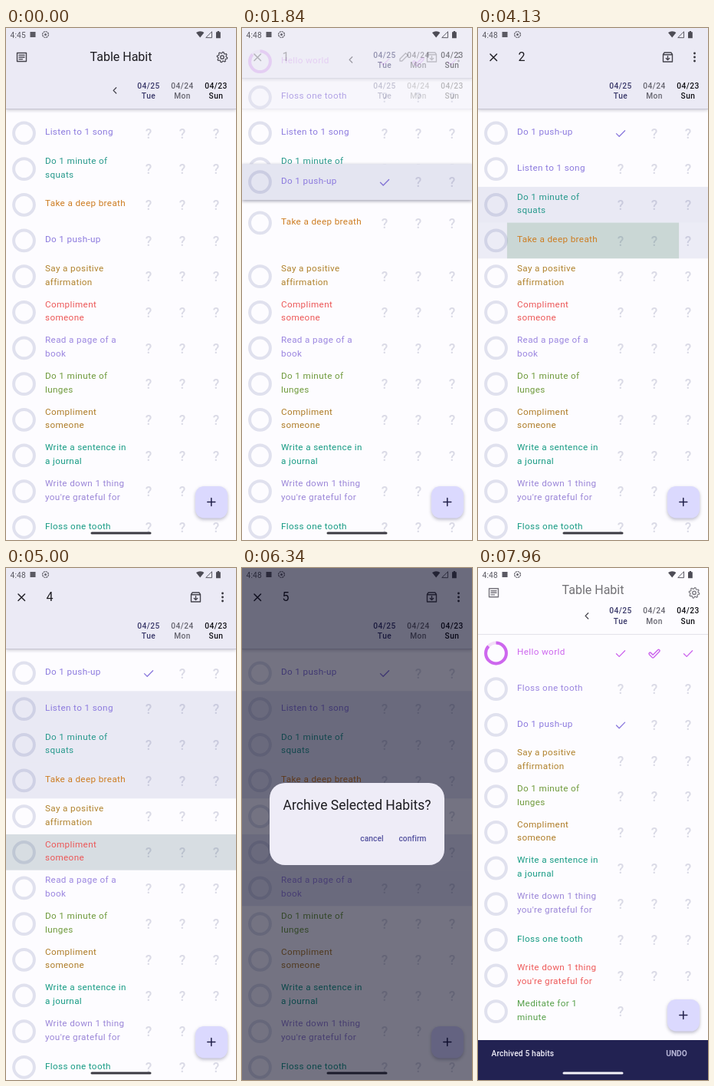
An HTML page that plays this animation: 300x667 px, repeating every 8000 ms.

```html
<!DOCTYPE html>
<html lang="en">
<head>
<meta charset="utf-8">
<title>Habit list</title>
<style>
  html, body { margin: 0; width: 100%; height: 100%; overflow: hidden; background: #fdfcff; }
  svg { display: block; width: 100%; height: 100%; font-family: Roboto, sans-serif; }
  .line { fill: none; stroke-linecap: round; stroke-linejoin: round; }
  .habit { font-size: 11.7px; letter-spacing: .365px; }
  .mark { font-size: 17.5px; font-weight: 500; fill: #dadae6; text-anchor: middle; }
  .date { font-size: 10.2px; font-weight: 500; letter-spacing: .45px; text-anchor: middle; }
  .title { font-size: 16px; fill: #1c1b20; }
</style>
</head>
<body>
<svg id="stage" viewBox="0 0 300 667"></svg>
<script>
const LOOP = 8000, ROW = 46.67, TOP = 43.6, COLS = [186, 230, 274];
const OPEN = 106, SHUT = 66, INK = '#45444d', TINT = '#ebeaf5', PAPER = '#fdfcff', VEIL = '#3f4791';
const stage = document.getElementById('stage');

const clamp = (v, a = 0, b = 1) => Math.min(b, Math.max(a, v));
const ramp = (t, a, b) => clamp((t - a) / (b - a));
const ease = (t, a, b) => (1 - Math.cos(Math.PI * ramp(t, a, b))) / 2;
const pulse = (t, a, b, c, d) => ramp(t, a, b) - ramp(t, c, d);

function set(el, attrs) {
  for (const k in attrs) el.setAttribute(k, attrs[k]);
  return el;
}
function add(parent, tag, attrs = {}, text) {
  const el = set(document.createElementNS('http://www.w3.org/2000/svg', tag), attrs);
  if (text !== undefined) el.textContent = text;
  parent.appendChild(el);
  return el;
}
const group = (parent = stage) => add(parent, 'g');
const move = (el, x, y) => el.setAttribute('transform', `translate(${x} ${y})`);
const fade = (el, o) => {
  el.setAttribute('opacity', o.toFixed(3));
  el.style.display = o <= 0 ? 'none' : '';
};
const stroke = (parent, d, color = INK, width = 1.4) =>
  add(parent, 'path', { d, class: 'line', stroke: color, 'stroke-width': width });
const tick = (parent, x, color, width = 1.35) =>
  stroke(parent, `M${x - 5.5} .7l3.7 3.7l7.4 -7.6`, color, width);

// text, colour, time selected (selected rows are archived later)
const HABITS = [
  ['Hello world', '#cd67ee'],
  ['Floss one tooth', '#9b86e0'],
  ['Listen to 1 song', '#8c7ade', 4450],
  ['Do 1 minute of|squats', '#27998c', 3300],
  ['Take a deep breath', '#cd7d22', 4080],
  ['Do 1 push-up', '#8c7ade'],
  ['Say a positive|affirmation', '#b0822c'],
  ['Compliment|someone', '#ec5757', 4800],
  ['Read a page of a|book', '#9b86e0', 5150],
  ['Do 1 minute of|lunges', '#6f9a3c'],
  ['Compliment|someone', '#ae7c27'],
  ['Write a sentence in|a journal', '#179b84'],
  ['Write down 1 thing|you\'re grateful for', '#9b86d8'],
  ['Floss one tooth', '#179b84'],
  ['Write down 1 thing|you\'re grateful for', '#ee5a5a'],
  ['Meditate for 1|minute', '#57a04a']
];
const HELLO = 0, PUSH = 5, LAST = 15, GRAB = 900;

const defs = add(stage, 'defs');
const blur = add(defs, 'filter', { id: 'soft', x: '-30%', y: '-30%', width: '160%', height: '170%' });
add(blur, 'feGaussianBlur', { stdDeviation: 2 });
add(stage, 'rect', { width: 300, height: 667, fill: PAPER });
const list = group();

function makeRow([label, color, at], i) {
  const g = group(list), row = { g, at, i };
  const band = attrs => add(g, 'rect', { width: 300, y: -ROW / 2, height: ROW, ...attrs });
  if (i === PUSH) {
    row.shadow = band({ fill: '#77778a', filter: 'url(#soft)', y: -ROW / 2 + 1.5 });
    row.sheet = band({ fill: PAPER });
  }
  add(g, 'circle', { cx: 23.5, r: 13.4, fill: 'none', stroke: i === HELLO ? '#f3def8' : '#e0e1ee', 'stroke-width': 4 });
  if (i === HELLO) {
    add(g, 'circle', { cx: 23.5, r: 13.4, fill: 'none', stroke: color, 'stroke-width': 4,
      pathLength: 100, 'stroke-dasharray': '87 13', transform: 'rotate(-90 23.5 0)' });
    tick(g, COLS[0], color);
    tick(g, COLS[1], color, 4.4);
    tick(g, COLS[1], PAPER, 1.5);
    tick(g, COLS[2], color);
  } else {
    row.marks = COLS.slice(0, i === LAST ? 1 : 3).map(x => add(g, 'text', { x, y: 6.8, class: 'mark' }, '?'));
  }
  if (i === PUSH) row.tick = tick(g, COLS[0], color);
  if (at || i === PUSH) row.veil = band({ fill: VEIL });
  if (at) row.ripple = band({ fill: '#0d5d1e' });
  const lines = label.split('|');
  lines.forEach((s, n) => add(g, 'text', {
    x: 51, y: 2.2 + (n - (lines.length - 1) / 2) * 17.5, class: 'habit', fill: color }, s));
  return row;
}
const rows = HABITS.map(makeRow);
list.appendChild(rows[PUSH].g);

function makeHeader() {
  const g = group();
  const shade = add(g, 'rect', { width: 300, fill: '#8b8b9c', opacity: .5, filter: 'url(#soft)' });
  const back = add(g, 'rect', { width: 300, fill: TINT });
  const edge = add(g, 'rect', { width: 300, height: 1, fill: '#c9c8d5' });
  const dates = group(g);
  [['04/25', 'Tue', '#3b3a6b'], ['04/24', 'Mon', '#66656f'], ['04/23', 'Sun', '#111116']].forEach(([d, w, fill], n) => {
    add(dates, 'text', { x: COLS[n], y: -27.5, class: 'date', fill }, d);
    add(dates, 'text', { x: COLS[n], y: -14, class: 'date', fill }, w);
  });
  return { g, dates, size(h) {
    set(shade, { height: h + 1 });
    set(back, { height: h });
    set(edge, { y: h - 1 });
    move(dates, 0, h);
  }, back, shade, edge };
}

// Normal header
const base = makeHeader();
stroke(base.dates, 'M143.7 -28.2l-3.6 3.6l3.6 3.6', INK, 1.3);
const title = add(base.g, 'text', { x: 150, class: 'title', 'text-anchor': 'middle' }, 'Table Habit');
const icons = group(base.g);
stroke(icons, 'M14.5 -5.5h12v11h-12zM17 -2.6h7M17 0h7M17 2.6h4.5');
add(icons, 'circle', { cx: 282, r: 2.2, fill: 'none', stroke: INK, 'stroke-width': 1.3 });
const gear = Array.from({ length: 32 }, (_, k) => {
  const a = (k + .5) * Math.PI / 16, r = k % 4 < 2 ? 6.8 : 5.2;
  return `${(282 + r * Math.cos(a)).toFixed(2)} ${(r * Math.sin(a)).toFixed(2)}`;
});
stroke(icons, `M${gear.join('L')}Z`, INK, 1.2);

// Selection header
const pick = makeHeader();
pick.size(OPEN);
stroke(pick.g, 'M16 34l8.5 8.5M24.5 34l-8.5 8.5', '#222128', 1.5);
const count = add(pick.g, 'text', { x: 52.5, y: 43, class: 'title' });
const pencil = stroke(pick.g, 'M206 43v-2.7l7.5 -7.5l2.7 2.7l-7.5 7.5z');
stroke(pick.g, 'M241.5 34.5l1.7 -2.5h8.6l1.7 2.5v9.5h-12zM241.5 34.8h12M247.5 36.8v4.6M245.3 39.4l2.2 2.2l2.2 -2.2');
[33, 38, 43].forEach(cy => add(pick.g, 'circle', { cx: 282.5, cy, r: 1.4, fill: '#33323a' }));

// Floating button
const fab = group();
const button = attrs => add(fab, 'rect', { x: 247, width: 42, height: 41.5, rx: 11.5, ...attrs });
button({ y: 599, fill: '#6a6a88', opacity: .45, filter: 'url(#soft)' });
button({ y: 597, fill: '#dbd9fe' });
stroke(fab, 'M262.8 617.5h10M267.8 612.5v10', '#22214a', 1.5);

// Snack bar
const snack = group();
add(snack, 'rect', { y: 615, width: 300, height: 53, fill: '#222252' });
add(snack, 'text', { x: 17.5, y: 635.5, 'font-size': 10.2, 'font-weight': 500, fill: '#f1effa', 'letter-spacing': .15 }, 'Archived 5 habits');
add(snack, 'text', { x: 259, y: 635.7, 'font-size': 10.2, 'font-weight': 700, fill: '#b6b5d6', 'text-anchor': 'middle' }, 'UNDO');

// System bars
const clock = add(stage, 'text', { x: 5.5, y: 12.5, 'font-size': 10.2, fill: '#5a5962', 'letter-spacing': .2 });
add(stage, 'rect', { x: 31.5, y: 5, width: 7, height: 7, fill: '#5b5a63' });
add(stage, 'circle', { cx: 51.5, cy: 8.5, r: 3.9, fill: 'none', stroke: '#66656e', 'stroke-width': 1.4, 'stroke-dasharray': '2.2 .8' });
add(stage, 'circle', { cx: 51.5, cy: 8.5, r: 1.5, fill: '#66656e' });
add(stage, 'path', { d: 'M248 6q5.2 -3.6 10.4 0l-5.2 6.5z', fill: '#4d4c55' });
stroke(stage, 'M261 12.3l7.5 -7.5v7.5z', '#5d5c65', 1);
add(stage, 'path', { d: 'M274 5.2h1.7v-1.2h2.4v1.2h1.7v8h-5.8z', fill: '#4d4c55' });
const pill = add(stage, 'rect', { x: 110.5, y: 656.5, width: 79, height: 3, rx: 1.5 });

// Dialog
const scrim = add(stage, 'rect', { width: 300, height: 667, fill: '#000018' });
const dialog = group();
add(dialog, 'rect', { x: 36, y: 280, width: 228, height: 107, rx: 20, fill: '#eeecf7' });
add(dialog, 'text', { x: 150, y: 315, 'font-size': 17.5, fill: '#1c1b20', 'text-anchor': 'middle' }, 'Archive Selected Habits?');
[[169.5, 'cancel'], [222.5, 'confirm']].forEach(([x, s]) => add(dialog, 'text', {
  x, y: 355.5, 'font-size': 10.2, 'font-weight': 500, fill: '#5553a0', 'text-anchor': 'middle', 'letter-spacing': .1 }, s));

// Place in the list; the dragged row pushes its neighbours down as it passes
function slotOf(i, t) {
  if (i === 2) return 2 + ease(t, 2080, 2330);
  if (i === 3) return 3 + ease(t, 1930, 2180);
  if (i === 4) return 4 + ease(t, 1715, 1965);
  if (i === PUSH) {
    const drag = 131 / ROW;
    return PUSH - drag * ease(t, 1360, 2230) - (3 - drag) * ease(t, 2520, 2800);
  }
  return i;
}

function drawRow(row, t, top, closed) {
  const { i, at } = row, slot = slotOf(i, t);
  const above = rows.filter(r => r.at && slotOf(r.i, t) < slot).length;
  move(row.g, 0, (top + (slot - above * closed) * ROW).toFixed(2));

  if (i === PUSH) {
    const lifted = pulse(t, GRAB, GRAB + 200, 2480, 2600);
    fade(row.sheet, lifted);
    fade(row.shadow, .7 * lifted);
    fade(row.veil, .13 * lifted);
    fade(row.tick, t < 300 ? 0 : 1);
    fade(row.marks[0], t < 300 ? 1 : 0);
  }
  if (at) {
    fade(row.veil, .1 * ramp(t, at, at + 60));
    const w = 300 * ramp(t, at - 20, at + 75);
    set(row.ripple, { x: 150 - w / 2, width: w });
    fade(row.ripple, t < at - 20 ? 0 : .15 * (1 - ramp(t, at + 90, at + 330)));
    fade(row.g, 1 - ramp(t, 6800, 6980));
  }
}

function draw(t) {
  const top = TOP + 86.4 * ease(t, 7520, 8160);
  const closed = ease(t, 7230, 7480);
  rows.forEach(row => drawRow(row, t, top, closed));

  const picking = clamp(pulse(t, GRAB, GRAB + 150, 1720, 1890) + pulse(t, 3300, 3480, 6750, 6920));
  const h = t < GRAB + 150 ? OPEN : clamp(top - 24, SHUT, OPEN);
  const open = (h - SHUT) / (OPEN - SHUT);
  base.size(h);
  fade(base.g, 1 - picking);
  const flat = ramp(t, 7780, 7940);
  base.back.setAttribute('fill', flat ? `rgb(${235 + 18 * flat},${234 + 18 * flat},${245 + 10 * flat})` : TINT);
  fade(base.shade, .5 * (1 - flat));
  fade(base.edge, 1 - .5 * flat);
  set(title, { y: 42.5 - .45 * (OPEN - h) });
  fade(title, Math.pow(open, .75));
  move(icons, 0, 38 - .3 * (OPEN - h));
  fade(icons, Math.pow(open, .5));

  fade(pick.g, picking);
  const n = t < 3300 ? 1 : rows.filter(r => r.at && t >= r.at).length;
  count.textContent = n;
  fade(pencil, n === 1 ? 1 : 0);

  const rise = ease(t, 6850, 7080);
  move(snack, 0, 53 * (1 - rise));
  move(fab, 0, -35 * rise);
  pill.setAttribute('fill', rise > .8 ? '#f2f1f8' : '#3b3a42');
  clock.textContent = t < 300 ? '4:45' : '4:48';

  const ask = pulse(t, 5772, 5922, 6620, 6760);
  fade(scrim, .54 * ask);
  fade(dialog, Math.min(1, 1.8 * ask));
}

const start = performance.now();
function tickFrame() {
  draw((performance.now() - start) % LOOP);
  requestAnimationFrame(tickFrame);
}
tickFrame();
</script>
</body>
</html>
```
